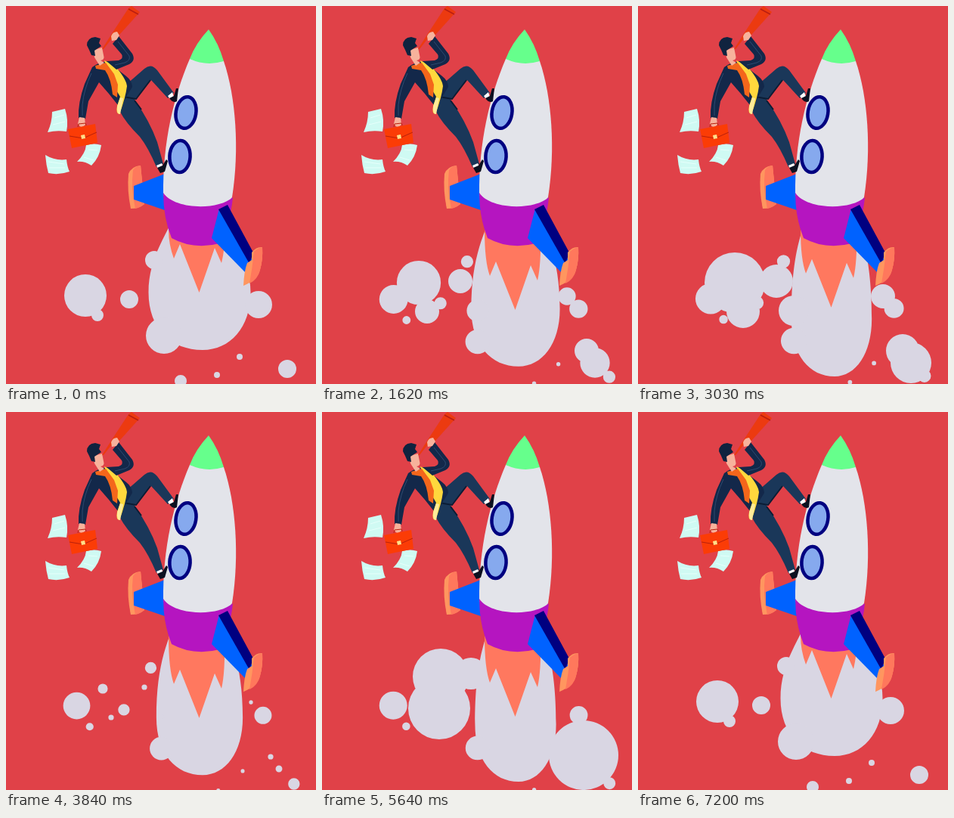
An HTML page that plays this animation: 410x500 px, repeating every 7230 ms.

```html
<!DOCTYPE html>
<html lang="en">
<head>
<meta charset="utf-8">
<title>Rocket ride</title>
<style>
html, body { margin: 0; width: 100%; height: 100%; overflow: hidden; background: #e04148; }
svg { display: block; width: 410px; height: 500px; }
</style>
</head>
<body>
<svg viewBox="0 0 410 500">
  <g fill="#d9d6e3"><path id="plume"/><path id="puffs"/></g>
  <path id="flame" fill="#ff785f"/>

  <g id="rocket">
    <path fill="#ff965f" d="M162 222Q166 212 178 211L183 262Q176 268 165 268Q160 244 162 222Z"/>
    <path fill="#ff785c" d="M168 217Q172 211 178 211L183 262Q177 267 171 268Q165 240 168 217Z"/>
    <path fill="#0062ff" d="M169 238L210 222V270L169 256Z"/>
    <path fill="#e3e4ea" d="M243 70C222 119 207 180 208 250Q225 272 265 268Q292 264 299 253C309 190 304 120 288 73Z"/>
    <path fill="#66ff8c" d="M268 31Q251 49 243 70Q265 80 288 73Q281 49 268 31Z"/>
    <path fill="#b515c0" d="M208 247C222 269 280 271 300 253C298 275 292 295 283 314Q248 323 219 307Q208 280 208 247Z"/>
    <path fill="#0062ff" d="M282 268L272 307L317 353L326 336Z"/>
    <path fill="#000080" d="M281 269L293 263L327 326L322 341Z"/>
    <path fill="#ff965f" d="M325 326Q331 318 339 319Q340 335 336 349Q333 362 314 370Q315 350 319 340L325 336Z"/>
    <path fill="#ff785c" d="M328 325Q333 320 339 319Q340 335 336 349Q333 362 322 367Q326 345 328 325Z"/>
    <g fill="#86a9ee" stroke="#000080" stroke-width="4.5">
      <ellipse cx="238" cy="141" rx="13.3" ry="21" transform="rotate(9 238 141)"/>
      <ellipse cx="230" cy="199" rx="13.6" ry="21" transform="rotate(3 230 199)"/>
    </g>
  </g>

  <g id="papers" fill="#cffaf3">
    <path d="M61 140L78 136Q83 151 80 166Q67 164 55 167Q61 154 61 140Z"/>
    <path d="M52 197Q65 205 80 203Q81 213 84 219Q70 224 56 221Q53 210 52 197Z"/>
    <path d="M106 184Q117 181 126 184Q124 200 113 211Q104 205 94 206Q105 195 106 184Z"/>
    <path fill="none" stroke="#e6fffb" d="M64 148L77 144M62 157L78 153M56 206L77 209M57 214L78 214M109 190L121 191M103 200L116 204"/>
  </g>

  <g id="man">
    <path fill="#1a3759" d="M160 103L183 83Q192 75 200 85L222 115L214 122L192 98L170 124Q190 152 200 180L208 209L199 213Q188 187 177 173Q158 154 151 140L150 117Z"/>
    <path fill="none" stroke="#0b1c34" stroke-width="2" d="M155 120L172 123L191 98M170 125L179 137"/>
    <path fill="#fff" d="M214 119L220 114L222 120L217 123ZM199 211L206 208L208 213L201 215Z"/>
    <path fill="#0c1020" d="M216 122L222 119L225 109L228 109L226 126Q221 129 216 122ZM200 214L207 211L212 203L214 205L210 219L204 221Z"/>
    <path fill="#13284a" d="M114 81Q121 75 134 73L145 82L158 92Q167 99 167 107L158 122L152 136L136 116L123 101L109 126L105 149L96 148Q95 128 104 103Z"/>
    <path fill="#ffd83d" d="M130 72L143 78Q159 96 160 106Q158 122 150 143Q145 143 147 132L151 120L138 98Z"/>
    <path fill="#ffeb9a" d="M151 121L155 122L151 143Q146 143 147 133Z"/>
    <path fill="#f4661b" d="M118 79L132 75L143 90L148 104L147 121L141 117Q139 96 131 85L119 83Z"/>
    <path fill="#13284a" d="M133 73L149 72Q156 69 153 64L141 50L149 40L167 63Q172 72 163 77L146 84Z"/>
    <path fill="none" stroke="#2d4a70" d="M148 47L163 66Q165 72 157 75L144 78M113 89Q103 110 101 131V145"/>
    <path fill="#f7b29c" d="M116 58L127 55L129 65Q131 71 125 72L130 75L124 79L117 68Z"/>
    <path fill="#10233f" d="M107 52Q107 42 118 41L125 43L123 49L126 53L117 59L118 66L113 65L110 58Z"/>
    <path fill="#ec3a10" d="M127 57L141 35L162 3L166 0L177 8L150 38L140 43L129 57Z"/>
    <path fill="none" stroke="#b91e12" stroke-width="1.5" d="M162 4L175 11"/>
    <path fill="#f7b29c" d="M139 40Q141 34 147 34L150 39L146 45L140 46ZM97 147L104 148L105 157L100 161L95 156Z"/>
    <path fill="#fb3c06" d="M82 163L118 156L121 181L87 188Z"/>
    <path fill="none" stroke="#b8200c" d="M84 172L102 175L120 167M95 160L96 156L105 155L106 158"/>
    <path fill="#ffe08a" d="M99 171L104 170L105 175L100 176Z"/>
  </g>
</svg>
<script>
const LOOP = 7230, CYCLE = 7200, BEAT = 2400;

// Puffs as x, y, radius: drifters always show, each burst of clouds swells in turn.
const drifters = [[105, 383, 28], [121, 409, 8], [163, 388, 12], [196, 336, 12], [209, 436, 24],
  [334, 395, 18], [372, 480, 12], [309, 464, 4], [279, 488, 4], [231, 496, 8]];
const spread = [[128, 366, 40], [139, 404, 22], [183, 364, 22], [206, 403, 20], [324, 384, 16],
  [350, 456, 22], [361, 472, 27]];
const heaps = [[157, 350, 37], [155, 392, 41], [197, 346, 21], [346, 454, 46]];
const bursts = [spread, spread, heaps];

const clamp = v => Math.max(0, Math.min(1, v));
const draw = (id, d) => document.getElementById(id).setAttribute("d", d);

function circle([x, y, r]) {
  return r < .3 ? "" : `M${x - r} ${y}a${r} ${r} 0 1 0 ${2 * r} 0a${r} ${r} 0 1 0 ${-2 * r} 0Z`;
}

function plumePath(b) {
  const w = 67.5 - (b - 455) * .41, l = 256 - w, r = 256 + w, m = b - 76;
  return `M230 262C215 300 ${l} 330 ${l} ${m}C${l} ${b - 28} ${256 - w * .55} ${b} 260 ${b}` +
    `C${256 + w * .6} ${b} ${r} ${b - 30} ${r} ${m}C${r} 330 295 300 282 262Z`;
}

function flamePath(y) {
  return `M215 296Q215 ${y - 64} 222 ${y - 45}L230 ${y - 64}L255.5 ${y}L276 ${y - 59}` +
    `L285 ${y - 39}Q290 ${y - 60} 289 300Z`;
}

// Drifters move away from the nozzle and shrink as the flame grows.
const drift = (age) => ([x, y, r]) =>
  [x + (x - 256) * .08 * age, y + (y - 300) * .07 * age, r * (1 - .38 * age)];

function cloudPath(puffs, dt) {
  const f = clamp((850 - Math.abs(dt)) / 350), size = f * f * (3 - 2 * f);
  return puffs.map(([x, y, r]) => circle([x, y, r * size])).join("");
}

function frame(now) {
  const t = Math.floor(now % LOOP / 30) * 30 % CYCLE;
  const u = t % BEAT / BEAT, pulse = Math.sin(Math.PI * u);
  draw("plume", plumePath(455 + 35 * Math.sin(Math.PI * Math.sqrt(u)) ** .75));
  draw("flame", flamePath(379 + 27 * pulse));
  draw("puffs", drifters.map(drift(pulse)).map(circle).join("") +
    bursts.map((puffs, i) => cloudPath(puffs, t - 1000 - 2080 * i)).join(""));
  requestAnimationFrame(frame);
}
frame(0);
</script>
</body>
</html>
```
